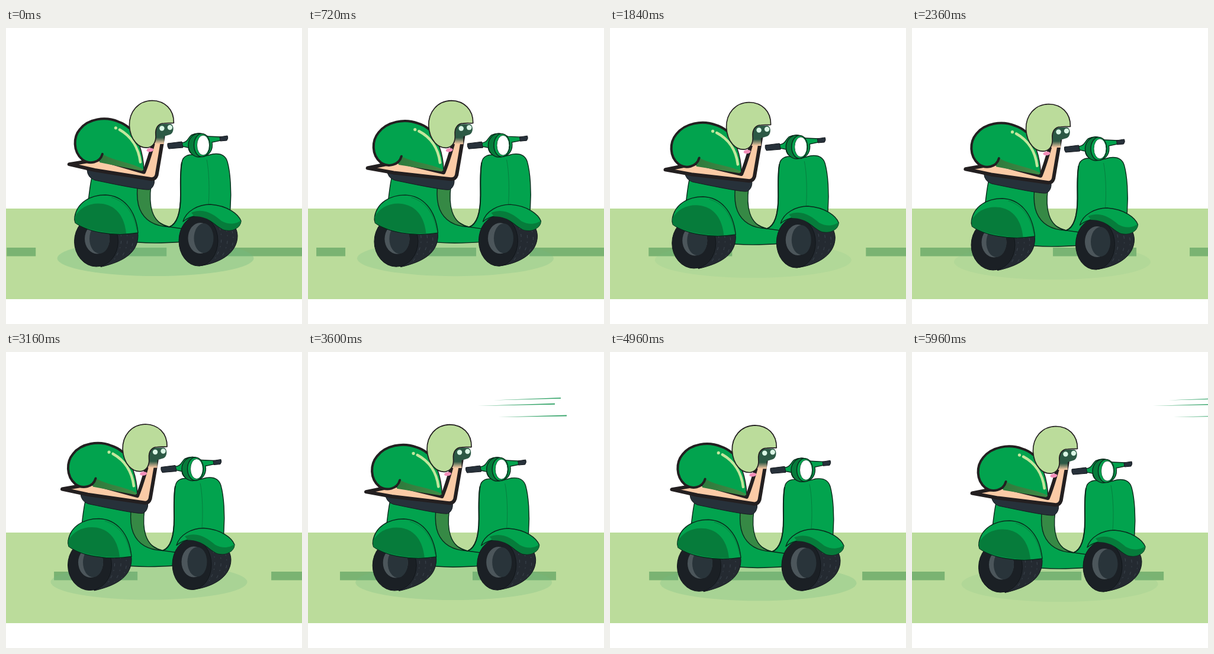
Animation, 500 px wide and 500 px high, one loop 6 s. Source, as an HTML page:

```html
<!DOCTYPE html>
<html lang="en">
<head>
<meta charset="utf-8">
<title>Snail on a scooter</title>
<style>
html, body { margin: 0; width: 100%; height: 100%; overflow: hidden; background: #fff; }
svg { display: block; width: 100vw; height: 100vh; }
.green { fill: #02a34e; stroke: #0a2a1c; stroke-width: 1.4; }
.dark { fill: #067c3b; }
.tread { fill: none; stroke: #3d4750; stroke-width: 1; stroke-dasharray: 5 6 2 8; }
.ink { stroke: #231f20; stroke-linejoin: round; stroke-linecap: round; }
</style>
</head>
<body>
<svg viewBox="0 0 500 500">
  <defs>
    <linearGradient id="fold" x1="0" x2="1">
      <stop offset="0" stop-color="#2d7a3c"/><stop offset="1" stop-color="#448a45"/>
    </linearGradient>
    <linearGradient id="stalk" x1="0" y1="0" x2="0" y2="1">
      <stop offset=".68" stop-color="#2c5945"/><stop offset="1" stop-color="#fbcba6"/>
    </linearGradient>
  </defs>

  <rect y="305" width="500" height="153" fill="#bbdc9b"/>
  <path id="dashes" fill="#7ab372"/>
  <g id="streaks" fill="#37a56b">
    <path d="M26 81.500L140 77V78.800Z"/>
    <path d="M0 91L130 86.800V88.800Z"/>
    <path d="M34 110L150 106.500V108.500Z"/>
  </g>

  <g id="ride">
    <ellipse id="shadow" cx="252.500" cy="389" rx="166" ry="30" fill="#73b982"/>

    <!-- body and leg shield -->
    <path class="green" d="M146 248C142 262 141 278 138 300L180 362H222C245 364 275 363 300 361L306 320L276 336C252 330 235 310 222 268Z"/>
    <path d="M222 268L245 266C241 296 244 330 276 336C252 335 234 325 226 306C221 294 221 282 222 268Z" fill="#368945" stroke="#0a2a1c" stroke-width="1.400"/>
    <path class="green" d="M297 227C299 215 309 213 322 214C332 219 341 215 349 213C363 211 371 216 374 226C379 244 381 275 379 303L377 325L305 340L276 336C291 330 295 305 295 282C295 260 294 242 297 227Z"/>
    <path d="M297 227C294 242 295 260 295 282C295 305 291 330 276 336" fill="none" stroke="#0a2a1c" stroke-width="2"/>
    <path d="M339 222C343 240 344 275 342 298" fill="none" stroke="#08753b" stroke-width=".8"/>

    <!-- wheels -->
    <g stroke="#11161a">
      <path d="M154 318C190 318 222 326 223 350C223 377 203 394 160 403.500Z" fill="#242a31"/>
      <path class="tread" d="M192 340Q201 367 180 395M202 340Q211 364 194 389M212 344Q219 363 206 383"/>
      <ellipse cx="152.500" cy="360.500" rx="37" ry="42.500" fill="#1b2025"/>
      <ellipse cx="154" cy="356" rx="21" ry="25.500" fill="#4c565b" stroke="none"/>
      <ellipse cx="158" cy="356" rx="17" ry="25" fill="#29343a" stroke="none"/>

      <path d="M324 316C366 314 390 326 391 351C391 378 365 397 326 402Z" fill="#242a31"/>
      <path class="tread" d="M361 338Q370 366 350 394M372 340Q379 364 364 387M382 343Q388 363 376 379"/>
      <ellipse cx="325" cy="359.500" rx="33" ry="42.500" fill="#1b2025"/>
      <ellipse cx="328" cy="355" rx="20.500" ry="26" fill="#4c565b" stroke="none"/>
      <ellipse cx="334" cy="355" rx="16.500" ry="25" fill="#29343a" stroke="none"/>
    </g>

    <!-- fenders -->
    <path class="green" d="M116 319C120 295 142 282 168 282C197 283 219 306 223 346C180 353 137 344 117 329Q115 324 116 319Z"/>
    <path class="dark" d="M116 319C125 302 144 294 164 297C187 301 200 319 203 347C171 348 135 341 117 329Z"/>
    <path d="M178 286C202 293 216 313 221 341" fill="none" stroke="#08753b" stroke-width=".8"/>
    <path class="green" stroke-linejoin="round" d="M299 327C304 309 325 298 345 298C375 300 393 315 397 326C396 338 382 344 369 341C352 336 345 317 322 317.500C312 318 305 322 299 327Z"/>
    <path class="dark" d="M313 312C334 303 351 315 364 326C378 334 391 330 397 325C397 338 382 344 369 341C355 336 346 318 318 318Z"/>

    <!-- seat -->
    <path d="M137 240L250 253C252 262 249 270 242 273C232 274 188 265 150 257Q138 253 137 240Z" fill="#27313a" stroke="#14191e"/>

    <!-- snail -->
    <g id="snail" class="ink">
      <path d="M107 229L158 221L233 243C238 231 246 205 252 183H265.500L254.500 248Q252 256 244 254.500L150 239Z" fill="#fbcba6" stroke-width="6"/>
      <path d="M163 212C159 227 141 230 129 221C113 207 114 183 125 170C139 152 168 148 190 157.500Q200 161 208 168C224 186 232 212 233 240L158 225Z" fill="#02a34e" stroke="none"/>
      <path d="M165 213C184 224 211 226 232 238L230 241L158 226Z" fill="url(#fold)" stroke="none"/>
      <path d="M163 212C159 227 141 230 129 221C113 207 114 183 125 170C139 152 168 148 190 157.500Q200 161 208 168" fill="none" stroke-width="4"/>
      <path d="M208 168C224 186 232 212 233 240" fill="none" stroke-width="1.500"/>
      <path d="M192 171C211 182 224 201 227 226" fill="none" style="stroke:#c3e79d" stroke-width="4.500"/>
      <circle cx="185.500" cy="168" r="2.600" fill="#c3e79d" stroke="none"/>
    </g>
    <g id="head">
      <path d="M252 177C252 166 258 162 266 162H278C285 164 284 178 277 180L267 183V196H251Z" fill="url(#stalk)"/>
      <circle cx="263.500" cy="169.500" r="4.200" fill="#d9f6e5"/>
      <circle cx="277" cy="168" r="4.200" fill="#d9f6e5"/>
      <ellipse cx="243.500" cy="206" rx="6" ry="3.200" fill="#f48fba" transform="rotate(-8 243.500 206)"/>
      <path class="ink" d="M283.500 160.500C284 137 268 123 247 122.500C223 123 208 142 208.500 165C210 190 225 204 240 202C250 200 254 191 253 180C252 168 258 161 267 161C274 160 279 161 283.500 160.500Z" fill="#bbdc9b" stroke-width="1.700"/>
    </g>

    <!-- handlebar and headlight -->
    <path class="green" d="M297 194C307 193 307 186 313 181C323 176 333 178 341 183L363 184V190L348 193C350 205 344 215 334 217C320 219 309 213 308 202L298 200Z"/>
    <path d="M273 195L297 192L299 202L275 204Q272 200 273 195ZM361 184L374 182Q376 186 373 190L362 191Z" fill="#27313a" stroke="#14191e"/>
    <ellipse class="green" cx="326" cy="198" rx="18" ry="20" style="fill:#067c3b"/>
    <ellipse cx="331" cy="198" rx="13.500" ry="19.500" class="green"/>
    <ellipse cx="333" cy="198" rx="10.500" ry="17" fill="#fff" stroke="#075c30"/>
  </g>
</svg>
<script>
const LOOP = 6000, TILE = 591;
// time, ride x, ride y, road shift, shadow strength
const keys = [
  [0, 0, 0, 2, .36],
  [1360, -6.5, .3, -1090, .14],
  [2360, -15.5, 6, -1894, .13],
  [3160, -11, -.5, -2642, .25],
  [4080, -1, .7, -3466, .29],
  [4960, -2, 1.3, -4070, .28],
  [5960, -3, 3, -4942, .14],
  [6000, -3, 3, -4975, .14]
];
const marks = [[0, 49], [136, 134], [360, 141]];
const get = id => document.getElementById(id);
const [ride, snail, head, shadow, dashes, streaks] =
  ["ride", "snail", "head", "shadow", "dashes", "streaks"].map(get);
const treads = document.querySelectorAll(".tread");
const ease = u => (1 - Math.cos(Math.PI * u)) / 2;

function draw(t) {
  const i = keys.findIndex(k => k[0] > t);
  const a = keys[i - 1], b = keys[i];
  const u = (t - a[0]) / (b[0] - a[0]);
  const mix = (n, w) => a[n] + (b[n] - a[n]) * w;
  const e = ease(u), road = mix(3, u);

  ride.setAttribute("transform", `translate(${mix(1, e)} ${mix(2, e)})`);
  shadow.setAttribute("opacity", mix(4, e));

  const start = ((road % TILE) + TILE) % TILE - TILE;
  let d = "";
  for (let x = start; x < 500; x += TILE)
    for (const [at, len] of marks) d += `M${x + at} 371h${len}v14.500h${-len}z`;
  dashes.setAttribute("d", d);
  treads.forEach(p => p.setAttribute("stroke-dashoffset", road));

  // engine shake lifts and drops the tail
  const k = .1 + .45 * (1 - Math.cos(2 * Math.PI * t / 159.5));
  snail.setAttribute("transform",
    `translate(245 255.500) matrix(${1 + .02 * k} ${-.05 * k} 0 1 0 0) translate(-245 -255)`);
  head.setAttribute("transform", `translate(${-1.2 * k} 0)`);

  const phase = t % 800;
  streaks.setAttribute("transform", `translate(${500 - 3 * (phase - 330)} 0)`);
}

const begin = performance.now();
function frame() {
  draw((performance.now() - begin) % LOOP);
  requestAnimationFrame(frame);
}
draw(0);
requestAnimationFrame(frame);
</script>
</body>
</html>
```
